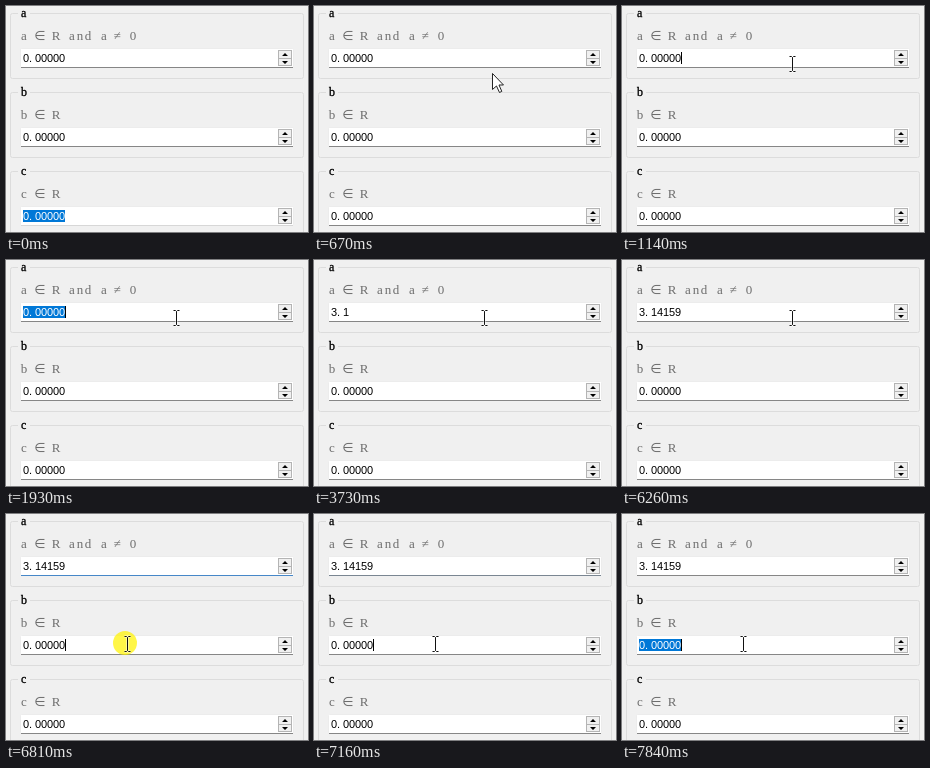
Write an HTML page that moves like this. It is 302 px wide and 226 px high and loops after 8000 ms.

```html
<!DOCTYPE html>
<html lang="en">
<head>
<meta charset="utf-8">
<title>Coefficients</title>
<style>
html, body { margin: 0; width: 100%; height: 100%; overflow: hidden; background: #f0f0f0; }
svg { display: block; width: 302px; height: 226px; }
.title { font: 12px "Liberation Serif", serif; fill: #000; stroke: #000; stroke-width: .3px; }
.label { font: 13px "Liberation Serif", "DejaVu Sans", serif; fill: #6d6d6d; text-anchor: middle; }
.value { font: 11px "Liberation Sans", sans-serif; }
</style>
</head>
<body>
<svg viewBox="0 0 302 226">
  <g id="rows"></g>
  <circle id="halo" r="12" fill="#fff200" opacity=".72"/>
  <g id="beam" fill="none">
    <path d="M-3 -7.5H-1L0 -6.5L1 -7.5H3M0 -6.5V6.5M-3 7.5H-1L0 6.5L1 7.5H3" stroke="#fff" stroke-width="2.4" opacity=".6"/>
    <path d="M-3 -7.5H-1L0 -6.5L1 -7.5H3M0 -6.5V6.5M-3 7.5H-1L0 6.5L1 7.5H3" stroke="#111"/>
  </g>
  <path id="arrow" d="M.5 .5V16.5L4.5 13L7.5 19.5L9.8 18.4L7 12H11.5Z" fill="#fff" stroke="#222"/>
</svg>
<script>
const LOOP = 8000, STEP = 79, TEXT_X = 17, CELL = 6;
const $ = id => document.getElementById(id);
const cells = (n, x, w) => Array.from({ length: n }, (_, i) => x + i * w);

function makeRow(name, label, i) {
  const xs = cells(label.length, 18, 8).map((x, k) => k > 11 ? x - 3 : x);
  $('rows').insertAdjacentHTML('beforeend', `
    <g transform="translate(0 ${i * STEP})">
      <rect x="4.5" y="7.5" width="293" height="65" rx="2" fill="none" stroke="#dcdcdc"/>
      <rect x="12" y="5" width="12" height="5" fill="#f0f0f0"/>
      <text class="title" x="15" y="11">${name}</text>
      <text class="label" x="${xs.join(' ')}" y="34">${label}</text>
      <rect x="14.5" y="42.5" width="273" height="19" rx="1" fill="#fff" stroke="#ececec"/>
      <rect id="line${i}" x="15" y="61" width="272" height="1"/>
      <rect x="272.5" y="44.5" width="13" height="15" fill="#f0f0f0" stroke="#b4b4b4"/>
      <path d="M272 52.5H286" stroke="#b4b4b4"/>
      <path d="M276 50L279 47L282 50ZM276 55L279 58L282 55Z"/>
      <rect id="sel${i}" x="17" y="46" width="42" height="12" fill="#0078d7"/>
      <text id="val${i}" class="value" x="${cells(7, TEXT_X, CELL).join(' ')}" y="56"></text>
      <rect id="caret${i}" y="46" width="1" height="12"/>
    </g>`);
}
['a ∈ R and a ≠ 0', 'b ∈ R', 'c ∈ R'].forEach((s, i) => makeRow(s[0], s, i));

const ZERO = '0.00000', PI = '3.14159';
const keys = [2550, 2810, 3140, 4260, 4610, 4870, 5600];
const selected = [[[1290, 2550]], [[7380, LOOP]], [[0, 70]]];
const carets = [
  [[880, 1400], [1930, 2480], [2550, 3730], [4260, 5470], [5600, 6260]],
  [[6740, 7230], [7840, LOOP]],
  []
];
const clicks = [[880, 1080], [1290, 1500], [6740, 7000], [7380, 7580]];
// time, x, y of the pointer
const path = [[200, 262, 185], [670, 178, 67], [800, 170.5, 58], [6260, 170.5, 58], [6740, 121.5, 130]];

const within = (spans, t) => spans.some(([a, b]) => t >= a && t < b);
const show = (el, on) => el.setAttribute('visibility', on ? 'visible' : 'hidden');
const ramp = (t, a, b) => Math.min(1, Math.max(0, (t - a) / (b - a)));
const mix = (p, q, k) => p + (q - p) * k;
const blend = (p, q, k) => `rgb(${p.map((v, i) => Math.round(mix(v, q[i], k)))})`;
const GREY = [134, 134, 134], BLUE = [70, 135, 200], PALE = [215, 215, 215];

function pointer(t) {
  let [, x, y] = path[0];
  for (let i = 1; i < path.length; i++) {
    const k = ramp(t, path[i - 1][0], path[i][0]), e = k * k * (3 - 2 * k);
    x = mix(x, path[i][1], e);
    y = mix(y, path[i][2], e);
  }
  return [x, y];
}

function draw(t) {
  const typed = keys.filter(k => t >= k).length;
  const values = [typed ? PI.slice(0, typed) : ZERO, ZERO, ZERO];
  values.forEach((v, i) => {
    const sel = within(selected[i], t), val = $('val' + i), caret = $('caret' + i);
    if (val.textContent !== v) val.textContent = v;
    val.setAttribute('fill', sel ? '#fff' : '#000');
    show($('sel' + i), sel);
    caret.setAttribute('x', TEXT_X + CELL * v.length);
    show(caret, within(carets[i], t));
  });
  $('line0').setAttribute('fill', blend(GREY, BLUE, ramp(t, 6600, 6800) - ramp(t, 6850, 7230)));
  $('line1').setAttribute('fill', blend(GREY, GREY, 0));
  $('line2').setAttribute('fill', blend(PALE, GREY, ramp(t, 70, 350)));

  const [x, y] = pointer(t), inField = (y - 42) % STEP < 20, seen = t >= 200;
  const at = `translate(${x} ${y})`;
  $('beam').setAttribute('transform', at);
  $('arrow').setAttribute('transform', at);
  $('halo').setAttribute('transform', `translate(${x - 2.5} ${y - 1})`);
  show($('beam'), seen && inField);
  show($('arrow'), seen && !inField);
  show($('halo'), within(clicks, t));
}

function tick() {
  draw(performance.now() % LOOP);
  requestAnimationFrame(tick);
}
tick();
</script>
</body>
</html>
```
